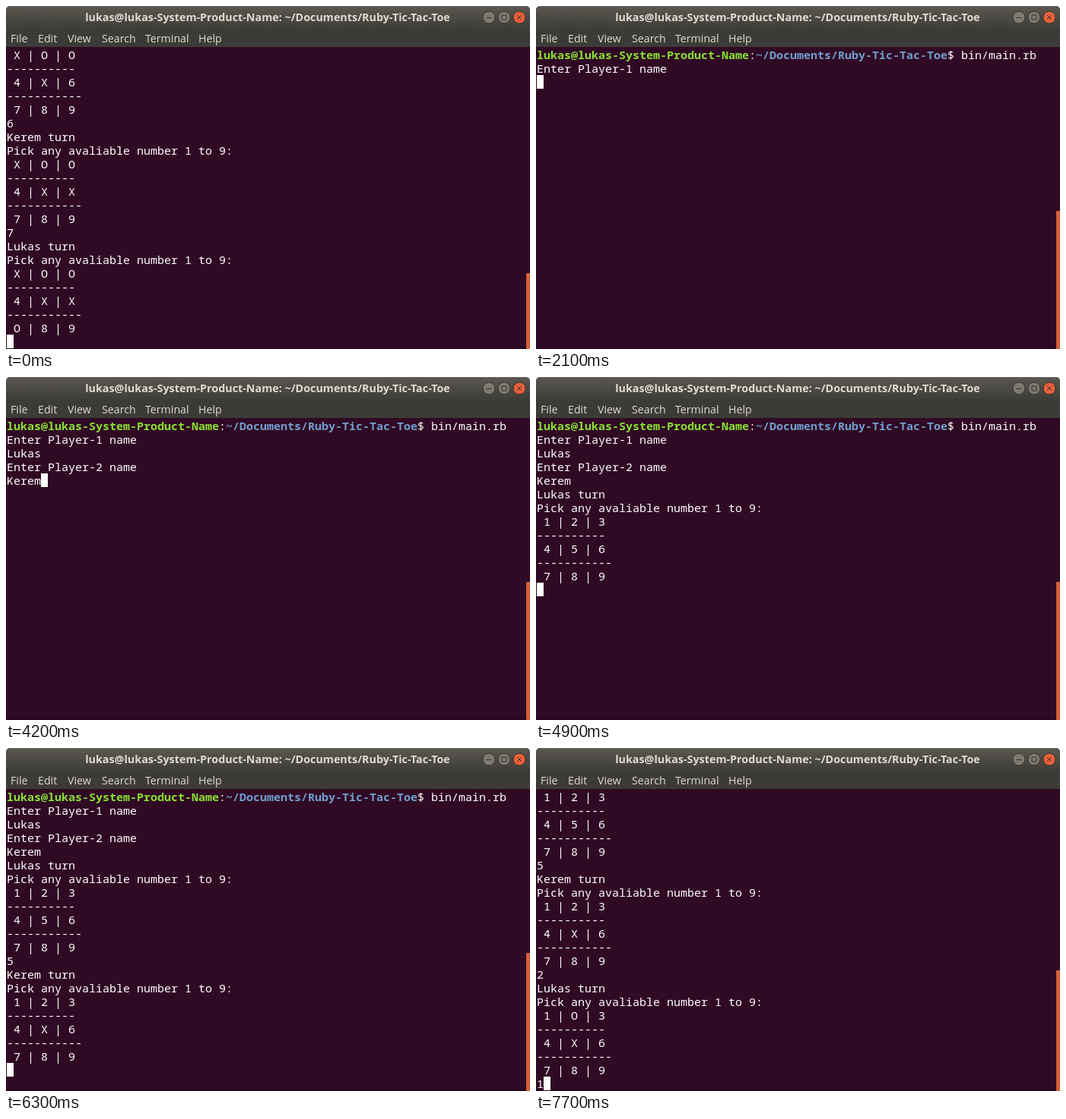
An HTML page for the animation above (8 s loop, 689x452 px).

```html
<!DOCTYPE html>
<html lang="en">
<head>
<meta charset="utf-8">
<title>Terminal tic-tac-toe</title>
<style>
  html, body { margin: 0; width: 100%; height: 100%; overflow: hidden; background: #fff; }
  svg { display: block; width: 689px; height: 452px; }
  .ui { font-family: "Open Sans", "Noto Sans", sans-serif; fill: #dfdbd2; }
  .title { font-size: 14.33px; font-weight: 700; text-anchor: middle; }
  .menu { font-size: 14.2px; }
  #screen { font: 15px "Noto Sans Mono", "DejaVu Sans Mono", monospace; fill: #fff; }
  #screen text { white-space: pre; }
  .host { fill: #8ae234; font-weight: 700; }
  .path { fill: #729fcf; font-weight: 700; }
</style>
</head>
<body>
<svg viewBox="0 0 689 452">
  <defs>
    <linearGradient id="bar" x2="0" y2="1">
      <stop offset="0" stop-color="#5a5850"/>
      <stop offset="1" stop-color="#3e3d38"/>
    </linearGradient>
  </defs>
  <path d="M0 54V6Q0 0 6 0H683Q689 0 689 6V54Z" fill="#3c3b37"/>
  <path d="M0 30V6Q0 0 6 0H683Q689 0 689 6V30Z" fill="url(#bar)"/>
  <path d="M5 .5H684" stroke="#6c6a61"/>
  <text class="ui title" x="344" y="20">lukas@lukas-System-Product-Name: ~/Documents/Ruby-Tic-Tac-Toe</text>
  <g stroke="#33322d">
    <circle cx="635" cy="15" r="8" fill="#7d7a71"/>
    <circle cx="655" cy="15" r="8" fill="#7d7a71"/>
    <circle cx="675" cy="15" r="8" fill="#ec6039"/>
    <path d="M631.5 15.5h7M652 12h6v6h-6zM672 12l6 6m0-6l-6 6" fill="none"/>
  </g>
  <g id="menu" class="ui menu"></g>
  <rect y="54" width="689" height="398" fill="#300a24"/>
  <rect y="449" width="689" height="3" fill="#29081f"/>
  <path id="thumb" fill="#d65f3b"/>
  <g id="screen"></g>
</svg>
<script>
const LOOP = 8000, ROWS = 22, ROW_H = 18, COL_W = 9, TOP = 55, LEFT = 1;
const HOST = 'lukas@lukas-System-Product-Name', PATH = '~/Documents/Ruby-Tic-Tac-Toe';
const PROMPT = `${HOST}:${PATH}$ `;
const byId = id => document.getElementById(id);

const menu = { File: 6, Edit: 42, View: 81, Search: 126, Terminal: 183, Help: 253 };
byId('menu').innerHTML = Object.entries(menu)
  .map(([label, x]) => `<text x="${x}" y="48">${label}</text>`).join('');

function board(cells) {
  const row = i => ' ' + [...cells.slice(i, i + 3)].join(' | ');
  return [row(0), '-'.repeat(10), row(3), '-'.repeat(11), row(6)];
}
const turn = (name, cells) => [`${name} turn`, 'Pick any avaliable number 1 to 9:', ...board(cells)];

const lastGame = [
  ...board('XOO4X6789'), '6',
  ...turn('Kerem', 'XOO4XX789'), '7',
  ...turn('Lukas', 'XOO4XXO89'), ''
];
const start = [PROMPT + 'bin/main.rb'];
const first = [...start, 'Enter Player-1 name'];
const second = [...first, 'Lukas', 'Enter Player-2 name'];
const opening = [...second, 'Kerem', ...turn('Lukas', '123456789')];
const reply = [...opening, '5', ...turn('Kerem', '1234X6789')];
const third = [...reply, '2', ...turn('Lukas', '1O34X6789')];

// Each step: start time, transcript, top of the scrollbar thumb
const steps = [
  [0, lastGame, 352],
  [700, [PROMPT], 270],
  [1400, start, 270],
  [2100, [...first, ''], 270],
  [2800, [...first, 'Lukas'], 270],
  [3500, [...second, ''], 270],
  [4200, [...second, 'Kerem'], 270],
  [4900, [...opening, ''], 270],
  [5600, [...opening, '5'], 270],
  [6300, [...reply, ''], 270],
  [7000, [...reply, '2'], 270],
  [7700, [...third, '1'], 293]
];

function markup(line) {
  if (!line.startsWith(PROMPT)) return line;
  const command = line.slice(PROMPT.length);
  return `<tspan class="host">${HOST}</tspan>:<tspan class="path">${PATH}</tspan>$ ${command}`;
}

function draw([, transcript, thumbTop]) {
  const lines = transcript.slice(-ROWS);
  const last = lines.length - 1;
  const texts = lines.map((line, i) =>
    `<text x="${LEFT}" y="${TOP + i * ROW_H + 15}">${markup(line)}</text>`);
  const cursor = `<rect x="${LEFT + lines[last].length * COL_W}" y="${TOP + last * ROW_H}"
    width="${COL_W}" height="${ROW_H}"/>`;
  byId('screen').innerHTML = texts.join('') + cursor;
  byId('thumb').setAttribute('d', `M684 452V${thumbTop + 1}q0 -1 1 -1h4V452Z`);
}

let shown;
function tick() {
  const time = performance.now() % LOOP;
  const step = steps.findLast(([at]) => at <= time);
  if (step !== shown) draw(shown = step);
  requestAnimationFrame(tick);
}
tick();
</script>
</body>
</html>
```
